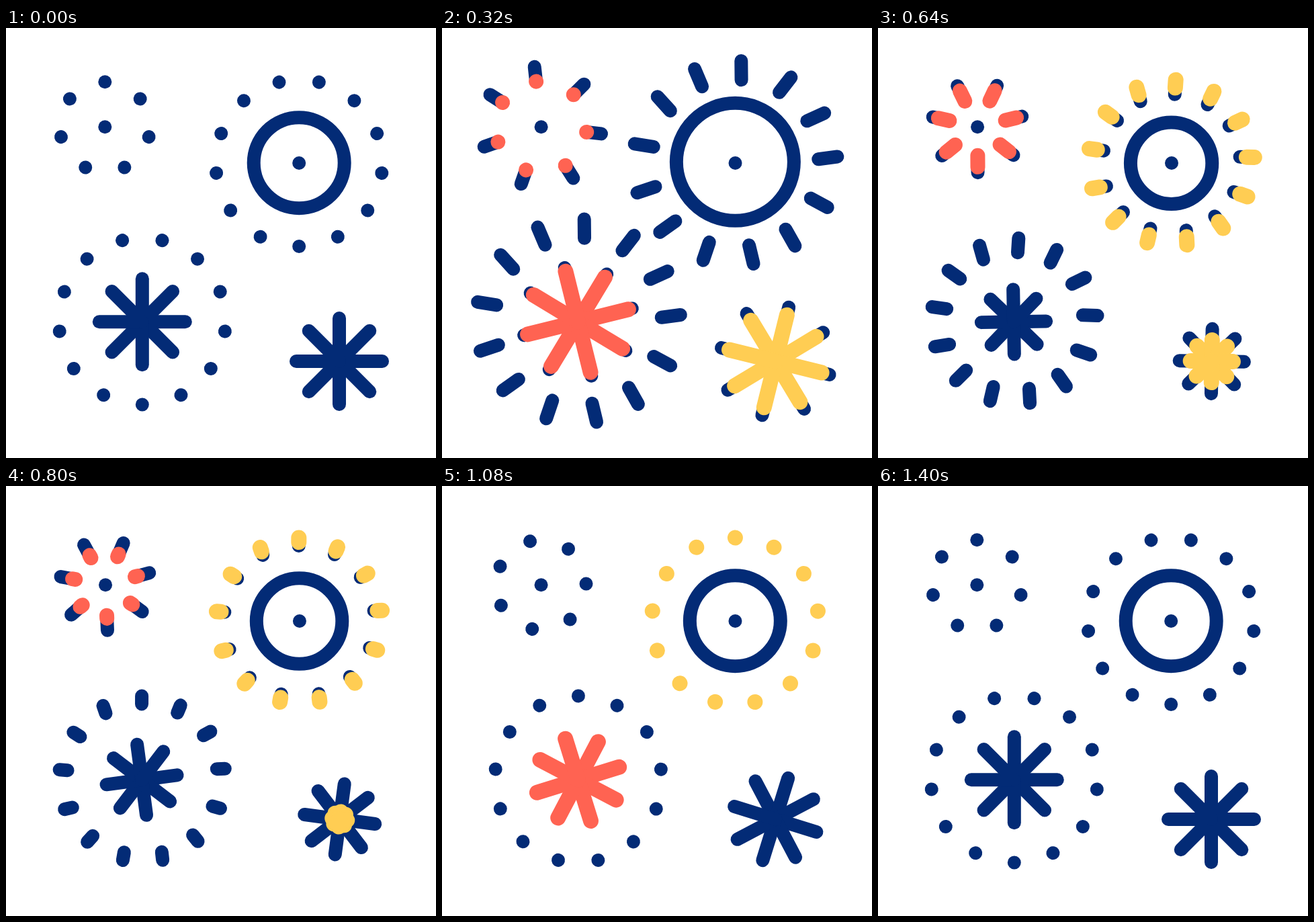
Recreate the animation shown at these times as an HTML page with a canvas. Size 640x640 px, loop 1480 ms.

```html
<!DOCTYPE html>
<html lang="en">
<head>
<meta charset="utf-8">
<title>Fireworks</title>
<style>
  html, body { margin: 0; width: 100%; height: 100%; overflow: hidden; background: #fff; }
  canvas { display: block; width: 100vw; height: 100vh; }
</style>
</head>
<body>
<canvas id="stage" width="640" height="640"></canvas>
<script>
const ctx = document.getElementById('stage').getContext('2d');
const LOOP = 1480, STEP = 40, LAST = 34;
const BLUE = '#032b76', RED = '#ff6352', YELLOW = '#ffcd53';
const RAD = Math.PI / 180;

// Sine ease from 0 at step a to 1 at step b.
function ease(k, a, b) {
  const p = Math.min(1, Math.max(0, (k - a) / (b - a)));
  return (1 - Math.cos(Math.PI * p)) / 2;
}

// Up from a to b, back down by c.
const pulse = (k, a, b, c) => ease(k, a, b) - ease(k, b, c);

function line(y1, y2, color, width) {
  ctx.strokeStyle = color;
  ctx.lineWidth = width;
  ctx.beginPath();
  ctx.moveTo(0, y1);
  ctx.lineTo(0, y2 + 0.01);
  ctx.stroke();
}

function dot(x, y) {
  ctx.fillStyle = BLUE;
  ctx.beginPath();
  ctx.arc(x, y, 10, 0, 2 * Math.PI);
  ctx.fill();
}

function ring(x, y, r) {
  ctx.strokeStyle = BLUE;
  ctx.lineWidth = 20;
  ctx.beginPath();
  ctx.arc(x, y, r, 0, 2 * Math.PI);
  ctx.stroke();
}

// Spokes from radius r1 to r2; lean(i) tilts each about its point at radius pivot.
function spokes(x, y, n, turn, r1, r2, color, width, lean = () => 0, pivot = 0) {
  for (let i = 0; i < n; i++) {
    ctx.save();
    ctx.translate(x, y);
    ctx.rotate((turn + i * 360 / n) * RAD);
    ctx.translate(0, -pivot);
    ctx.rotate(lean(i) * RAD);
    line(pivot - r1, pivot - r2, color, width);
    ctx.restore();
  }
}

const HALO = 124;
const uneven = i => 2 + 7 * Math.cos(112.5 * (i - 1.5) * RAD);

function halo(x, y, k, tint) {
  const turn = 45 * pulse(k, 0, 16, 32) - 180 / 13;
  const outer = HALO + 30 * pulse(k, 0, 6, 12.8);
  const inner = HALO - 24 * pulse(k, 11, 16, 22);
  spokes(x, y, 13, turn, inner, outer, BLUE, 20, uneven, HALO);
  if (tint && k >= 9 && k < 31) {
    spokes(x, y, 13, turn, HALO - 0.55 * (HALO - inner), HALO, tint, 23, uneven, HALO);
  }
}

function star(x, y, k, angle, tint, fill) {
  const turn = angle * pulse(k, 1, 16, 32);
  const r = 64 + 19.5 * ease(k, 0, 8) - 37.5 * ease(k, 9.5, 16) + 18 * ease(k, 16, 23);
  spokes(x, y, 8, turn, 0, r, BLUE, 20);
  if (fill > 0.001) spokes(x, y, 8, turn, 0, r * fill, tint, 23);
}

function spark(x, y, k) {
  const turn = -28.5 * pulse(k, 2, 18, 34);
  const outer = 67 + 23 * pulse(k, 0, 7, 14) + pulse(k, 7, 14, 26);
  const inner = 67 + ease(k, 0, 7) - 28 * pulse(k, 11, 16, 26) - ease(k, 16, 26);
  const part = 0.76 * pulse(k, 7, 13, 22);
  spokes(x, y, 7, turn, inner, outer, BLUE, 20);
  if (k >= 7 && k < 24) spokes(x, y, 7, turn, inner, inner + part * (outer - inner), RED, 22);
  dot(x, y);
}

function draw(k) {
  ctx.fillStyle = '#fff';
  ctx.fillRect(0, 0, 640, 640);
  ctx.lineCap = 'round';
  const sway = 0.8 * pulse(k, 0, 16, 32);

  spark(147.3 + sway, 147.2, k);

  halo(436.2 + sway / 2, 201, k, YELLOW);
  const r = 67.5 + 20.7 * ease(k, 0, 6) - 28.2 * ease(k, 6, 16) + 7.5 * ease(k, 16, 22);
  ring(436.2 + sway / 2, 201.3 - (r - 60) / 14, r);
  dot(436.2 + sway, 201);

  halo(202.8, 436.5, k);
  star(202.8 - sway, 437.3, k, 90, RED, 0.97 * pulse(k, 0, 8, 11) + pulse(k, 19, 26, 33));

  star(496 + sway, 496, k, -90, YELLOW, 0.97 * (ease(k, 0, 9) - ease(k, 10, 23)));
}

function tick() {
  const t = performance.now() % LOOP;
  draw(Math.min(LAST, Math.max(0, Math.floor(t / STEP) - 1)));
  requestAnimationFrame(tick);
}
tick();
</script>
</body>
</html>
```
